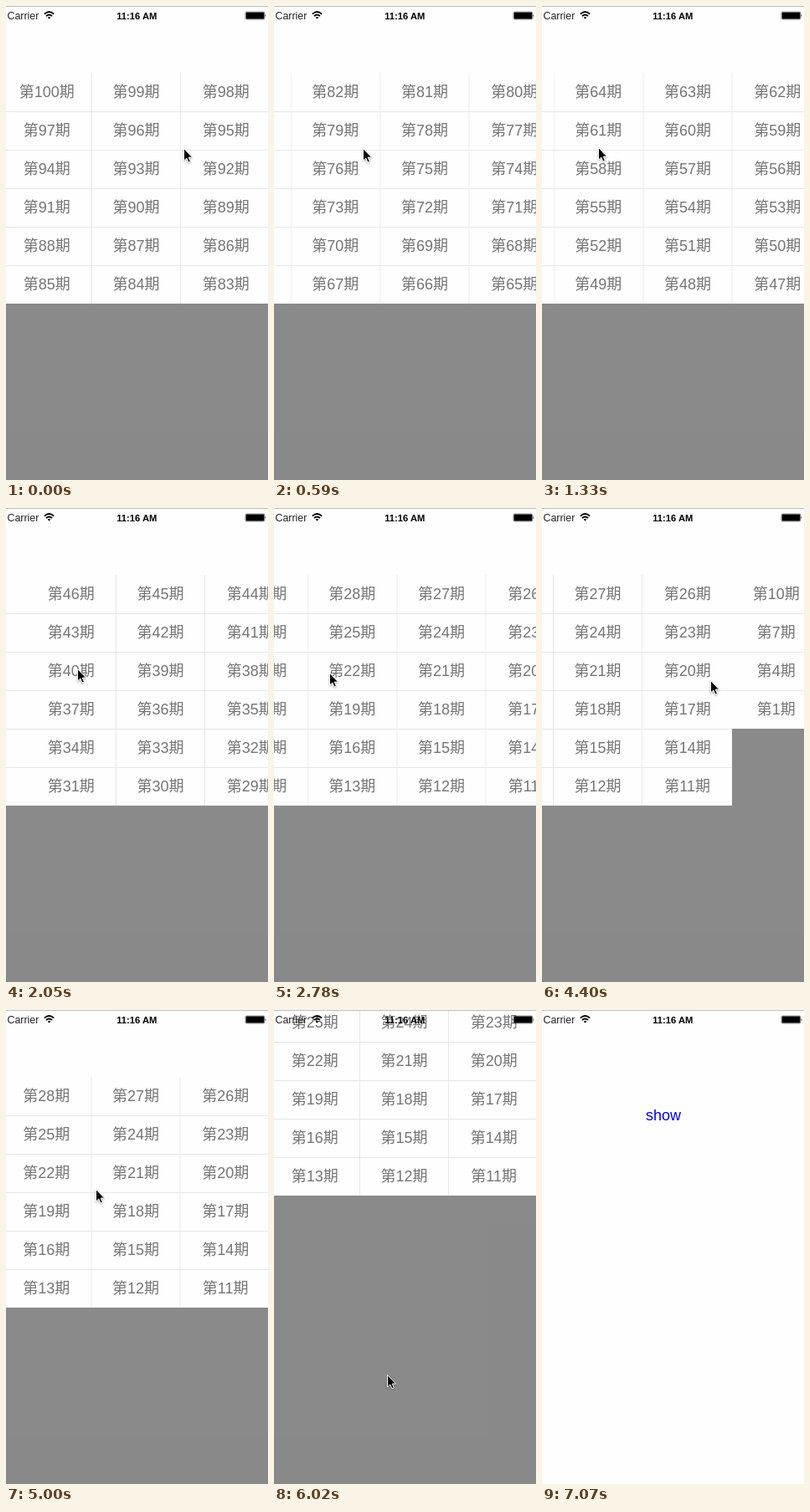
Animation, 313 px wide and 567 px high, one loop 7.13 s. Source, as an HTML page:

```html
<!DOCTYPE html>
<html lang="zh">
<head>
<meta charset="utf-8">
<title>Issue picker</title>
<style>
  html, body { margin: 0; width: 100%; height: 100%; overflow: hidden; }
  body { position: relative; background: #fefefe; font-family: "Liberation Sans", "Noto Sans CJK SC", "Noto Sans CJK", sans-serif; }
  #stage { position: absolute; left: 0; top: 0; width: 313px; height: 567px; overflow: hidden; background: #fefefe; }
  #stage > * { position: absolute; }
  #show { left: 124px; top: 114px; font-size: 18px; line-height: 24px; color: #00f; }
  #dim { left: 0; top: 80px; width: 313px; height: 487px; background: rgba(0, 0, 0, .46); }
  #panel { left: -4px; top: 80px; width: 320px; height: 276px; }
  .page { position: absolute; top: 0; width: 320px; background: #e7e7e7; }
  .cell {
    position: absolute; box-sizing: border-box; height: 46px;
    background: #fefefe; border: 0 solid #e7e7e7;
    color: #757575; font-size: 18px; line-height: 46px; text-align: center; white-space: nowrap;
  }
  #status { left: 0; top: 0; pointer-events: none; }
  #cursor { left: 0; top: 0; overflow: visible; filter: drop-shadow(0 1px 1px rgba(0, 0, 0, .35)); }
</style>
</head>
<body>
<div id="stage">
  <div id="show">show</div>
  <div id="dim"></div>
  <div id="panel"></div>
  <svg id="status" width="313" height="24">
    <rect width="313" height="1" fill="#bdbdbd"/>
    <text x="1.5" y="15.5" font-size="12.4" fill="#222">Carrier</text>
    <g fill="none" stroke="#000" stroke-width="1.9">
      <path d="M45.9 9.6Q51.5 4.6 57.1 9.6M48 12Q51.5 9 55 12"/>
      <path d="M51.5 15.6L49.6 13.6Q51.5 12.2 53.4 13.6Z" fill="#000" stroke="none"/>
    </g>
    <text x="156.3" y="15.5" font-size="11.2" font-weight="700" text-anchor="middle">11:16 AM</text>
    <rect x="286" y="7" width="23" height="9" rx="1.5" fill="none" stroke="#555" stroke-width=".6"/>
    <rect x="286.6" y="7.6" width="21.8" height="7.8" rx="1"/>
    <path d="M309.6 9.8q1.5 1.7 0 3.4z"/>
  </svg>
  <svg id="cursor" width="12" height="19">
    <path d="M.5 .5V15L3.8 12L6 17L8.4 16L6.2 11.1H10.6Z" stroke="#fff" stroke-width="1"/>
  </svg>
</div>
<script>
const LOOP = 7130, STEP = 146.3, PAGE = 320, ROW = 46, PER_PAGE = 18, ISSUES = 100;
const [show, dim, panel, cursor] = ['show', 'dim', 'panel', 'cursor'].map(id => document.getElementById(id));

// Pointer waypoints: time, x, y
const trail = [
  [0, 212, 170], [120, 212, 170], [370, 67, 169], [500, 67, 169],
  [820, 212, 171], [1069, 67, 169], [1330, 67, 169],
  [1600, 212, 180], [1850, 67, 190], [2000, 67, 192],
  [2380, 212, 195], [2629, 66, 197], [2790, 66, 197],
  [3076, 212, 197], [3325, 67, 196], [3500, 75, 196], [3657, 99, 196],
  [4050, 95, 200], [4300, 215, 205], [4974, 107, 214],
  [5600, 135, 436], [6050, 135, 436], [6560, 275, 540], [6720, 300, 580]
];
// Drag start, release, page direction
const swipes = [
  [120, 370, 1], [820, 1069, 1], [1600, 1850, 1],
  [2380, 2629, 1], [3076, 3325, 1], [4050, 4300, -1]
];
const GLIDE = 110, DISMISS = 5752, DISMISS_TIME = 500;

function buildPage(index) {
  const page = document.createElement('div');
  const count = Math.min(PER_PAGE, ISSUES - index * PER_PAGE);
  page.className = 'page';
  page.style.left = index * PAGE + 'px';
  page.style.height = Math.ceil(count / 3) * ROW + 'px';
  for (let i = 0; i < count; i++) {
    const col = i % 3, row = Math.floor(i / 3);
    const cell = document.createElement('div');
    cell.className = 'cell';
    cell.textContent = `第${ISSUES - index * PER_PAGE - i}期`;
    Object.assign(cell.style, {
      left: col * PAGE / 3 + 'px',
      top: row * ROW + 'px',
      width: PAGE / 3 + 'px',
      borderRightWidth: col < 2 ? '1px' : 0
    });
    if (row) {
      cell.style.borderTopWidth = '1px';
      cell.style.lineHeight = ROW - 2 + 'px';
    }
    page.append(cell);
  }
  panel.append(page);
}

function pointerAt(t) {
  const next = trail.findIndex(p => p[0] > t);
  if (next < 0) return trail[trail.length - 1].slice(1);
  const [t0, x0, y0] = trail[next - 1], [t1, x1, y1] = trail[next];
  const f = (t - t0) / (t1 - t0);
  return [x0 + (x1 - x0) * f, y0 + (y1 - y0) * f];
}

// The page follows the drag, then glides exponentially to rest
function scrollAt(t) {
  return swipes.reduce((sum, [start, release, dir]) => {
    if (t < start) return sum;
    const dragged = pointerAt(start)[0] - pointerAt(Math.min(t, release))[0];
    const rest = dir * PAGE - dragged;
    return sum + (t < release ? dragged : dir * PAGE - rest * Math.exp((release - t) / GLIDE));
  }, 0);
}

const easeInOut = f => f < .5 ? 2 * f * f : 1 - 2 * (1 - f) ** 2;

function draw(now) {
  const t = Math.floor((now % LOOP) / STEP) * STEP;
  const f = Math.min(1, Math.max(0, (t - DISMISS) / DISMISS_TIME));
  const [x, y] = pointerAt(t).map(Math.round);
  const scroll = Math.round(scrollAt(t) * 2) / 2;
  const lift = Math.round(276 * easeInOut(f));
  panel.style.transform = `translate(${-scroll}px, ${-lift}px)`;
  panel.style.display = dim.style.display = f < 1 ? 'block' : 'none';
  cursor.style.transform = `translate(${x}px, ${y}px)`;
}

for (let i = 0; i * PER_PAGE < ISSUES; i++) buildPage(i);

const began = performance.now();
function tick() {
  draw(performance.now() - began);
  requestAnimationFrame(tick);
}
tick();
</script>
</body>
</html>
```
